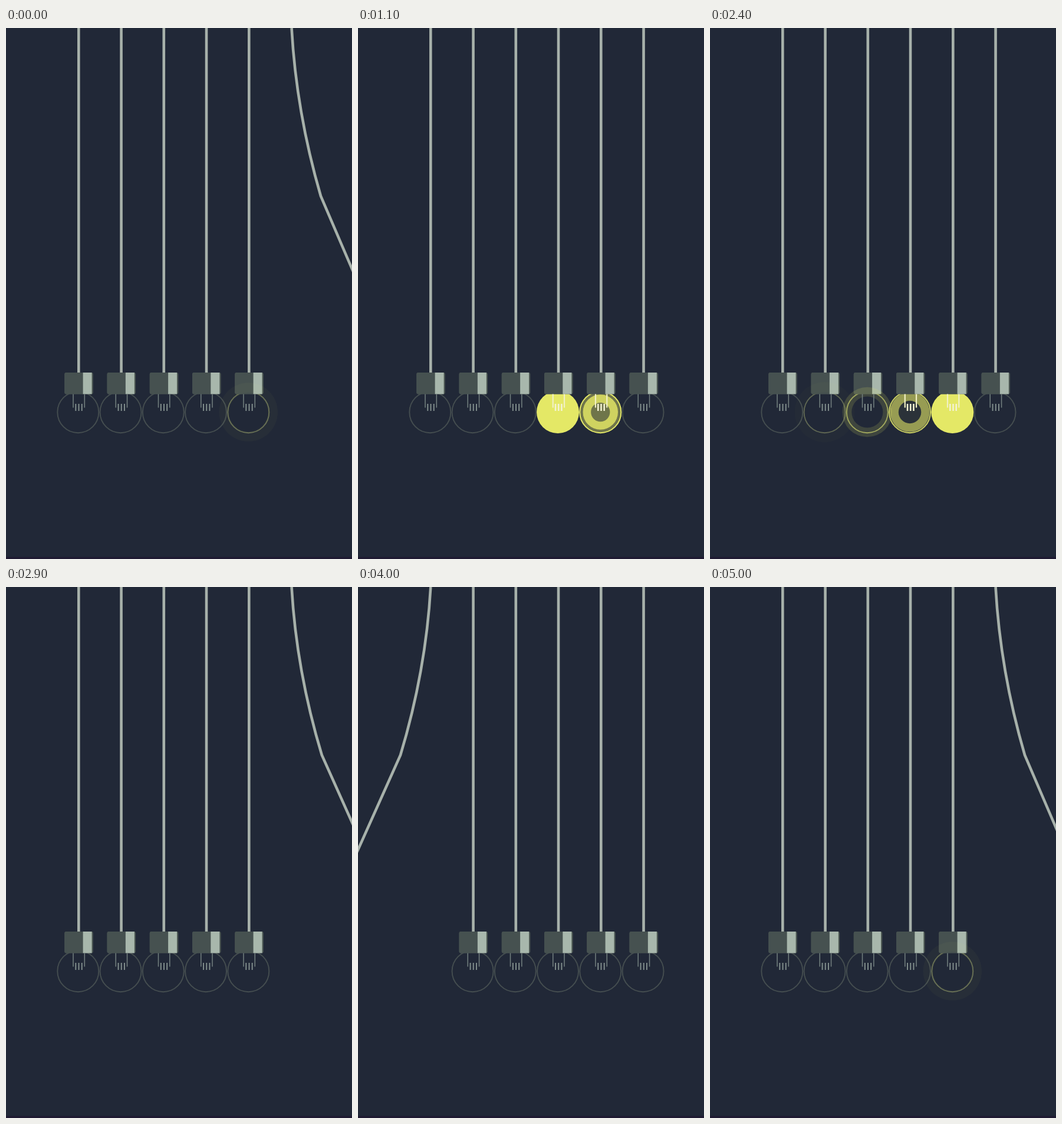
An HTML page with a canvas that plays this animation: 587x900 px, repeating every 5100 ms.

```html
<!DOCTYPE html>
<html lang="en">
<head>
<meta charset="utf-8">
<title>Swinging bulbs</title>
<style>
html, body { margin: 0; width: 587px; height: 900px; overflow: hidden; background: #212837; }
canvas { display: block; }
</style>
</head>
<body>
<canvas id="stage" width="587" height="900"></canvas>
<script>
const ctx = document.getElementById('stage').getContext('2d');
const LOOP = 5100, STEP = 100, PERIOD = 2500;
const COUNT = 6, LAST = COUNT - 1, FIRST_X = 123.3, GAP = 72.25;
const CABLE = 584, REACH = 174, HALF_SWING = 505;
const RIGHT_MID = 410, LEFT_MID = 1710, FADE = 120;
const YELLOW = '228,232,102';

// Signed time from a moment in the repeating cycle.
function since(phase, moment) {
  const d = (phase - moment + PERIOD * 1.5) % PERIOD;
  return d - PERIOD / 2;
}

// Fast departure, long hang, fast return.
function swing(phase, middle) {
  const u = since(phase, middle) / HALF_SWING;
  if (Math.abs(u) >= 1) return 0;
  return REACH * (1 - Math.pow(Math.abs(u), u < 0 ? 16 : 6));
}

function offset(i, phase) {
  if (i === 0) return -swing(phase, LEFT_MID);
  if (i === LAST) return swing(phase, RIGHT_MID);
  return 0;
}

// Each pulse is [switch-off moment, time lit before it].
function pulses(i) {
  if (i === LAST) return [[930, 1025]];
  if (i === 0) return [[2230, 1025]];
  return [
    [1085 + 35 * (4 - i), i === 4 ? 155 : 35],
    [2300 + 35 * (i - 1), i === 1 ? 155 : 35]
  ];
}

// 0 is fully lit, up to 1 while fading, null is dark.
function fadeOf(i, phase) {
  for (const [off, length] of pulses(i)) {
    const age = since(phase, off);
    if (age >= -length && age < FADE) return Math.max(0, age / FADE);
  }
  return null;
}

const yellow = alpha => `rgba(${YELLOW},${Math.max(0, Math.min(1, alpha))})`;

function disc(radius, fill) {
  ctx.beginPath();
  ctx.arc(-1, 67, radius, 0, Math.PI * 2);
  ctx.fillStyle = fill;
  ctx.fill();
}

function ring(inner, outer, fill) {
  ctx.beginPath();
  ctx.arc(-1, 67, outer, 0, Math.PI * 2);
  ctx.arc(-1, 67, inner, 0, Math.PI * 2, true);
  ctx.fillStyle = fill;
  ctx.fill();
}

function outline(color) {
  ctx.beginPath();
  ctx.arc(-1, 67.2, 35, 0, Math.PI * 2);
  ctx.strokeStyle = color;
  ctx.lineWidth = 1.9;
  ctx.stroke();
}

function box(x, y, w, h, radii, fill) {
  ctx.beginPath();
  ctx.roundRect(x, y, w, h, radii);
  ctx.fillStyle = fill;
  ctx.fill();
}

function socket() {
  box(-24, 0, 48.5, 36.5, 3, '#4b5652');
  box(-24, 0, 31.5, 36.5, [3, 0, 0, 3], '#465150');
  box(7.3, 0, 15, 36.5, 0, '#a8b7ac');
}

function filament(bright) {
  const wire = (x, y, h, w, color) => {
    ctx.fillStyle = color;
    ctx.fillRect(x - w / 2, y, w, h);
  };
  for (const x of [-9.3, 10]) wire(x, 36.5, 23, bright ? 2.2 : 1.5, bright ? '#f1f0c4' : '#748180');
  for (const x of [-5, 0.2, 5.4]) wire(x, 53, 12, bright ? 2.6 : 1.9, bright ? '#f3f2d2' : '#84918f');
}

function bulb(fade) {
  const glowing = fade !== null;
  const inner = 13 + 25 * fade, outer = 26 + 30 * fade;
  const light = glowing ? 1.1 * Math.pow(1 - fade, 2.2) : 0;
  outline('#454e50');
  if (fade === 0) {
    disc(36, yellow(1));
  } else if (glowing) {
    disc(36, yellow(0.75 - 2.8 * fade));
    if (outer < 36) ring(inner, outer, yellow(light));
    outline(yellow(1.15 - fade * 1.2));
  }
  socket();
  if (glowing && outer >= 36) ring(inner, outer, yellow(light * 0.75));
  filament(glowing && fade < 0.35);
}

function cable(x, shift, endY) {
  const mid = 0.295 * shift, midY = 285;
  const bulge = Math.sign(shift) * 10 * (1 - Math.abs(shift) / REACH);
  ctx.beginPath();
  ctx.moveTo(x, 0);
  ctx.quadraticCurveTo(x + mid * 0.16, midY / 2, x + mid, midY);
  ctx.quadraticCurveTo(x + (mid + shift) / 2 + bulge, (midY + endY) / 2, x + shift, endY + 1);
  ctx.strokeStyle = '#a7b1aa';
  ctx.lineWidth = 4.6;
  ctx.stroke();
}

function draw(time) {
  const phase = time % PERIOD;
  ctx.fillStyle = '#212837';
  ctx.fillRect(0, 0, 587, 900);
  ctx.fillStyle = '#1f1a32';
  ctx.fillRect(0, 896.5, 587, 3.5);
  for (let i = 0; i < COUNT; i++) {
    const x = FIRST_X + GAP * i, shift = offset(i, phase);
    const endY = Math.sqrt(CABLE * CABLE - shift * shift);
    cable(x, shift, endY);
    ctx.save();
    ctx.translate(x + shift, endY);
    ctx.rotate(-Math.asin(shift / CABLE));
    bulb(fadeOf(i, phase));
    ctx.restore();
  }
}

const start = performance.now();
function tick() {
  const time = (performance.now() - start) % LOOP;
  draw(Math.floor(time / STEP) * STEP);
  requestAnimationFrame(tick);
}
tick();
</script>
</body>
</html>
```
